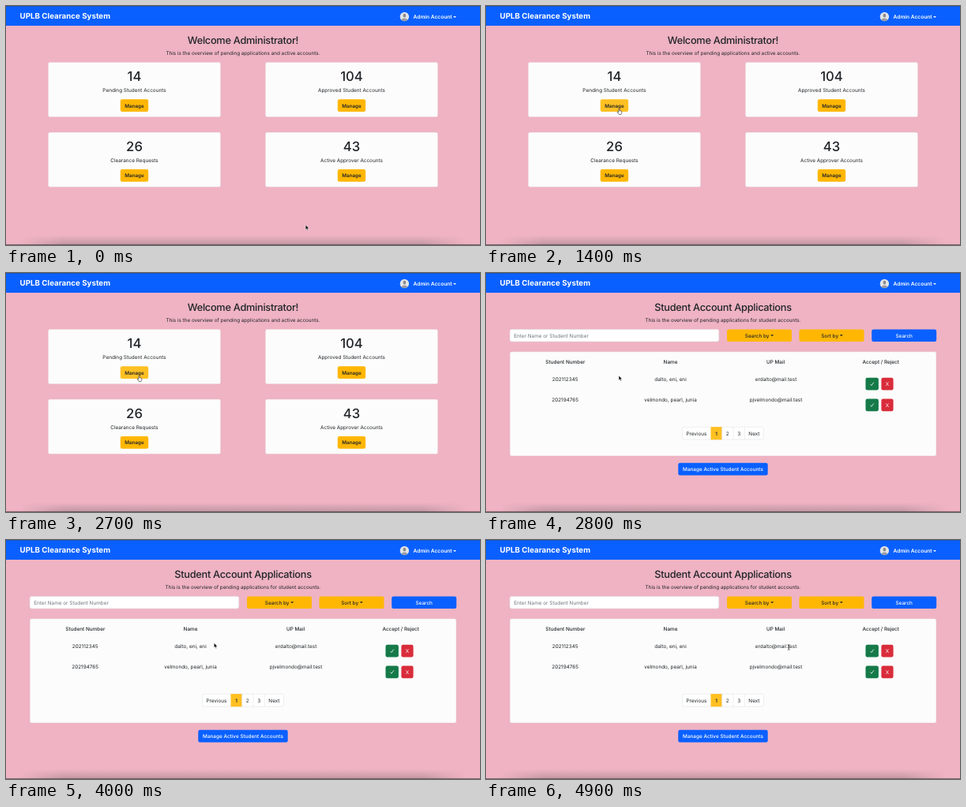
An HTML page for the animation above (5 s loop, 600x303 px).

```html
<!DOCTYPE html>
<html lang="en">
<head>
<meta charset="utf-8">
<title>Clearance System</title>
<style>
  html, body { margin: 0; width: 100%; height: 100%; overflow: hidden; background: #efb3c3; }
  svg { display: block; width: 100vw; height: 100vh; }
  text { font-family: Inter, "Noto Sans", sans-serif; font-size: 6.4px; fill: #212529; text-rendering: geometricPrecision; }
  .mid { text-anchor: middle; }
  .medium { font-weight: 500; }
  .semi { font-weight: 600; font-size: 6.3px; }
  .title { font-size: 12.8px; font-weight: 500; letter-spacing: -.3px; }
  .lead { font-size: 6.34px; }
  .count { font-size: 16.7px; font-weight: 500; }
  .white { fill: #fff; }
  .hint { fill: #6c757d; }
</style>
</head>
<body>
<svg id="stage" viewBox="0 0 600 303" preserveAspectRatio="none">
  <defs>
    <linearGradient id="fade" x2="0" y2="1">
      <stop stop-color="#555" stop-opacity="0"/>
      <stop offset="1" stop-color="#555" stop-opacity=".3"/>
    </linearGradient>
    <linearGradient id="ends">
      <stop offset=".03" stop-color="#000"/>
      <stop offset=".12" stop-color="#fff"/>
      <stop offset=".88" stop-color="#fff"/>
      <stop offset=".97" stop-color="#000"/>
    </linearGradient>
    <mask id="sides"><rect width="600" height="303" fill="url(#ends)"/></mask>
    <clipPath id="round"><circle cx="504.4" cy="13.5" r="5.7"/></clipPath>
  </defs>
  <rect width="600" height="303" fill="#efb3c3"/>
  <g id="dashboard"></g>
  <g id="applications"></g>
  <g id="header"></g>
  <rect y="291" width="600" height="12" fill="url(#fade)" mask="url(#sides)"/>
  <rect y="302.3" width="600" height=".7" fill="#54444a"/>
  <g id="arrow">
    <path d="M0 0V6L1.4 4.8L2.3 6.9L3.3 6.5L2.4 4.4H4.3Z" fill="#000" stroke="#fff" stroke-width=".5" stroke-linejoin="round"/>
  </g>
  <g id="hand">
    <path d="M-.6 .6Q0 -.3 .6 .6V2.7Q1.1 2.2 1.5 2.8Q2 2.4 2.4 3Q3.2 2.8 3.3 3.7V5.2Q3.2 6.2 2.6 7.2H-.3L-2.2 4.5Q-2.2 3.5 -1.3 3.9L-.6 4.6Z" fill="#fff" stroke="#222" stroke-width=".6" stroke-linejoin="round"/>
  </g>
  <g id="beam" fill="none">
    <path id="beamLine" d="M-1.5 -3.3Q0 -3.3 0 -2.5Q0 -3.3 1.5 -3.3M0 -2.5V2.5M-1.5 3.3Q0 3.3 0 2.5Q0 3.3 1.5 3.3M-.8 .8H.8" stroke="#333" stroke-width=".7"/>
  </g>
</svg>
<script>
const BLUE = "#0a60ff", YELLOW = "#ffb703", HOVER = "#ffc023", PANEL = "#fcfcfc";
const GREEN = "#157a48", RED = "#d92c3b", LINE = "#dadde0";
const LOOP = 5000, STEP = 100, PAGE_CHANGE = 2800;
const el = id => document.getElementById(id);

const box = (x, y, w, h, fill, extra = "") =>
  `<rect x="${x}" y="${y}" width="${w}" height="${h}" rx="2.3" fill="${fill}" ${extra}/>`;
const text = (x, y, value, cls = "mid") => `<text x="${x}" y="${y}" class="${cls}">${value}</text>`;
const caret = (x, y, fill) => `<path d="M${x} ${y}h4l-2 2z" fill="${fill}"/>`;
const outline = `stroke="${LINE}" stroke-width=".5"`;

function heading(title, lead) {
  return text(300, 48, title, "mid title") + text(300, 62, lead, "mid lead");
}

function card(x, y, count, label, id) {
  const cx = x + 109.2;
  return box(x, y, 218.4, 69.5, PANEL, `stroke="#e6bac6" stroke-width=".5"`)
    + text(cx, y + 23.4, count, "mid count")
    + text(cx, y + 37.9, label)
    + box(cx - 17.7, y + 47, 35.4, 15.7, YELLOW, `id="${id}"`)
    + text(cx, y + 57.2, "Manage", "mid semi");
}

function menuButton(x, label, textEnd) {
  return box(x, 71.4, 82, 15.6, YELLOW)
    + text(textEnd - 1.7, 81.5, label, "medium\" text-anchor=\"end")
    + caret(textEnd, 78.2, "#212529");
}

function applicantRow(y, number, name, mail) {
  const top = y - 4;
  return text(100.2, y, number) + text(233.5, y, name) + text(367, y, mail)
    + box(480.5, top, 16.4, 15.8, GREEN)
    + `<path d="M486.6 ${top + 8.3}l1.4 1.6l2.8 -4" fill="none" stroke="#fff" stroke-width=".75"/>`
    + box(500.4, top, 15.2, 15.8, RED)
    + text(508, top + 10.3, "X", "mid white");
}

function pagination() {
  const edges = [248.4, 284.5, 298.6, 313, 327.4, 351.4];
  const labels = ["Previous", "1", "2", "3", "Next"];
  return box(248.4, 195.3, 103, 15.8, "#fff", outline) + labels.map((label, i) => {
    const x = edges[i], w = edges[i + 1] - x, active = label === "1";
    const cell = active
      ? `<rect x="${x}" y="195.1" width="${w}" height="16.2" fill="#ffc021"/>`
      : i ? `<path d="M${x} 195.3v15.8" ${outline}/>` : "";
    return cell + text(x + w / 2, 205.5, label, active ? "mid semi" : "mid");
  }).join("");
}

el("header").innerHTML =
  `<rect width="600" height="25" fill="${BLUE}"/><rect width="600" height=".6" fill="#234a91"/>`
  + `<text x="17.6" y="16.1" class="white" style="font-size:9.75px;font-weight:700">UPLB Clearance System</text>`
  + `<g clip-path="url(#round)"><rect x="498" y="7" width="13" height="13" fill="#e3e5e8"/>`
  + `<ellipse cx="504.4" cy="12" rx="1.9" ry="2.5" fill="#8c8b90"/>`
  + `<path d="M500.4 20q0 -4.4 4 -4.4t4 4.4z" fill="#9b9a9f"/></g>`
  + `<text x="515.6" y="16.2" class="semi white" style="font-size:6.6px">Admin Account</text>`
  + caret(566, 13, "#fff");

el("dashboard").innerHTML =
  heading("Welcome Administrator!", "This is the overview of pending applications and active accounts.")
  + card(53.3, 71.3, 14, "Pending Student Accounts", "pending")
  + card(328.3, 71.3, 104, "Approved Student Accounts", "approved")
  + card(53.3, 160.1, 26, "Clearance Requests", "requests")
  + card(328.3, 160.1, 43, "Active Approver Accounts", "approvers");

el("applications").innerHTML =
  heading("Student Account Applications", "This is the overview of pending applications for student accounts.")
  + box(30.2, 71.5, 264.6, 15.4, "#fff", outline)
  + text(35.2, 81.5, "Enter Name or Student Number", "hint")
  + menuButton(305, "Search by", 360.2)
  + menuButton(396.5, "Sort by", 447.8)
  + box(488.2, 71.4, 82, 15.6, BLUE) + text(529.2, 81.5, "Search", "mid medium white")
  + box(30.2, 99.7, 539.8, 132.3, PANEL, `stroke="#e6bac6" stroke-width=".5"`)
  + ["Student Number", "Name", "UP Mail", "Accept / Reject"]
      .map((label, i) => text(100.4 + 133.1 * i, 114.6, label, "mid medium")).join("")
  + applicantRow(136.7, "202112345", "dalto, eni, eni", "erdalto@mail.test")
  + applicantRow(163.4, "202194765", "velmondo, pearl, junia", "pjvelmondo@mail.test")
  + pagination()
  + box(243.3, 240.7, 113.4, 15.8, BLUE)
  + text(300, 250.9, "Manage Active Student Accounts", "mid medium white");

function ease(time, start, duration) {
  const u = Math.min(1, Math.max(0, (time - start) / duration));
  return u * u * (3 - 2 * u);
}

function pointerAt(time) {
  if (time < PAGE_CHANGE) {
    const p = ease(time, 500, 880);
    return [379.2 - 210.7 * p, 277.6 - 147.4 * p + 32 * p * (1 - p)];
  }
  const p = ease(time, 3400, 1300);
  return [168.1 + 215.2 * p, 130 + 6 * p ** 3];
}

const within = (v, low, high) => v >= low && v <= high;

function render(time) {
  const [x, y] = pointerAt(time);
  const first = time < PAGE_CHANGE;
  const hovering = first && within(x, 145, 180.5) && within(y, 118, 134);
  const overText = !first && (within(x, 213, 254) || within(x, 336, 398));
  const active = hovering ? "hand" : overText ? "beam" : "arrow";
  el("dashboard").style.display = first ? "" : "none";
  el("applications").style.display = first ? "none" : "";
  el("pending").setAttribute("fill", hovering ? HOVER : YELLOW);
  for (const id of ["arrow", "hand", "beam"]) {
    el(id).style.display = id === active ? "" : "none";
    el(id).setAttribute("transform", `translate(${x} ${y})`);
  }
}

const began = performance.now();
function tick() {
  const time = (performance.now() - began) % LOOP;
  render(Math.floor(time / STEP) * STEP);
  requestAnimationFrame(tick);
}
render(0);
requestAnimationFrame(tick);
</script>
</body>
</html>
```
